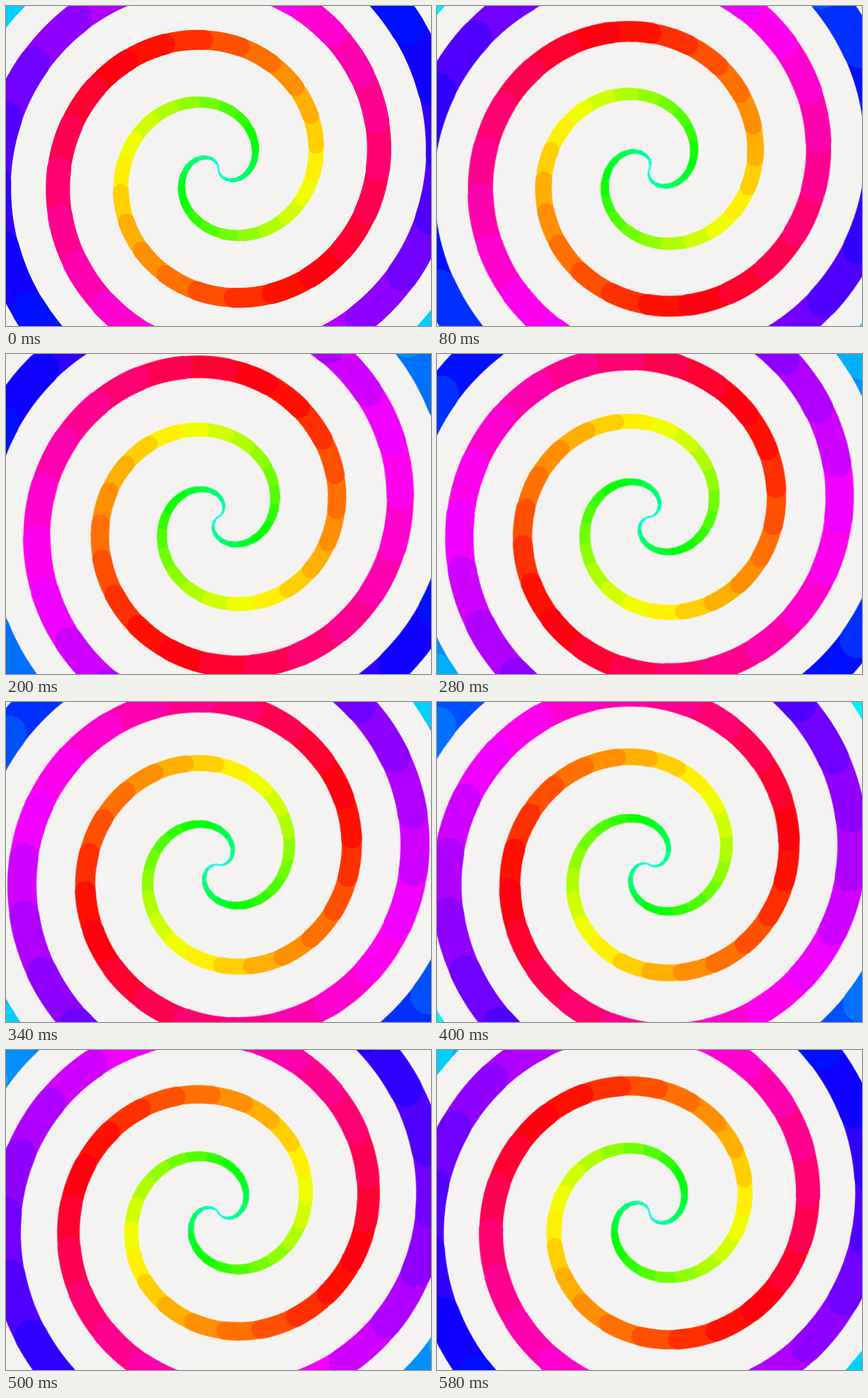
These frames come from a looping animation (600x452 px, 0.6 s). An HTML page:

```html
<!DOCTYPE html>
<html lang="en">
<head>
<meta charset="utf-8">
<title>Rainbow spiral</title>
<style>
  html, body { margin: 0; width: 100%; height: 100%; overflow: hidden; background: #f5f3f2; }
  svg { display: block; width: 600px; height: 452px; }
  path { fill: none; stroke-linecap: round; stroke-linejoin: round; }
  #spiral { transform-origin: 0 0; animation: spin 600ms steps(30) infinite; }
  @keyframes spin {
    from { transform: rotate(0deg); }
    to { transform: rotate(180deg); }
  }
</style>
</head>
<body>
<svg viewBox="0 0 600 452">
  <g transform="translate(300 230)"><g id="spiral"></g></g>
</svg>
<script>
  const SVG = 'http://www.w3.org/2000/svg';
  const BANDS = 48;          // one full turn of the colour wheel
  const SWEEP = 800 / BANDS; // degrees covered by each band
  const STEPS = 10;
  const spiral = document.getElementById('spiral');

  // Archimedean spiral: the radius grows half a pixel per degree.
  function point(deg, start) {
    const a = (start + deg) * Math.PI / 180;
    const r = deg / 2;
    return (r * Math.cos(a)).toFixed(2) + ' ' + (-r * Math.sin(a)).toFixed(2);
  }

  function band(k, start) {
    const pts = [];
    for (let i = 0; i <= STEPS; i++) pts.push(point((k + i / STEPS) * SWEEP, start));
    const path = document.createElementNS(SVG, 'path');
    path.setAttribute('d', 'M' + pts.join('L'));
    path.setAttribute('stroke', `hsl(${(540 - (k + 0.5) * 360 / BANDS) % 360}, 100%, 50%)`);
    path.setAttribute('stroke-width', (2 + 56 * (k + 0.5) / BANDS).toFixed(2));
    spiral.append(path);
  }

  // Outer bands go on top, so their round caps point inwards.
  for (const start of [90, 270]) {
    for (let k = 0; k < BANDS; k++) band(k, start);
  }
</script>
</body>
</html>
```
